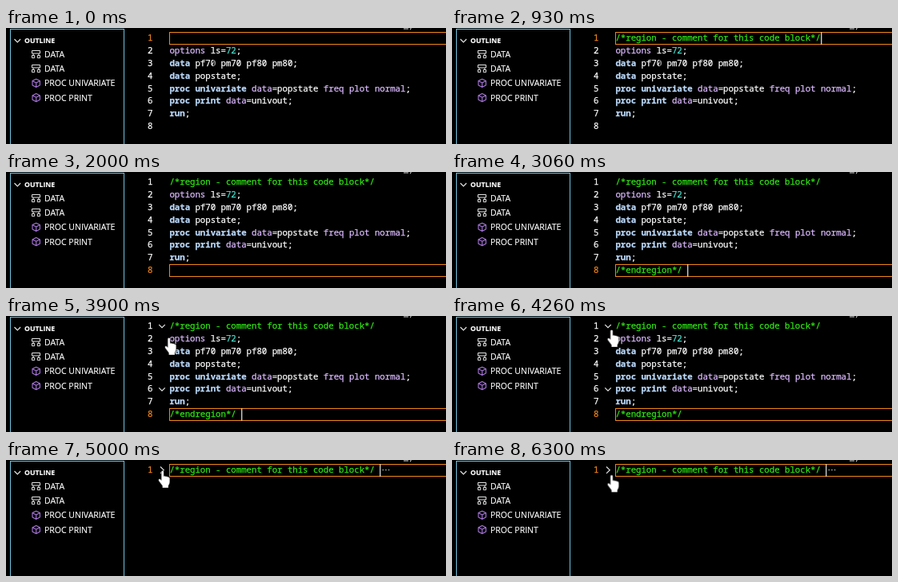
Animation, 550 px wide and 146 px high, one loop 6430 ms. Source, as an HTML page:

```html
<!DOCTYPE html>
<html lang="en">
<head>
<meta charset="utf-8">
<title>Folding a region</title>
<style>
html, body { margin: 0; width: 100%; height: 100%; overflow: hidden; background: #000; }
svg { display: block; width: 550px; height: 146px; }
text { white-space: pre; color: #fff; }
text, tspan { fill: currentColor; stroke: currentColor; stroke-width: .15px; }
.code text { font: 500 10.7px "Noto Sans Mono", "DejaVu Sans Mono", monospace; }
.code text, .code tspan { stroke-width: .25px; }
.tree text { font: 10.5px "Open Sans", "Noto Sans", sans-serif; }
.tree .title { font-size: 8.7px; font-weight: 700; }
.step { font-weight: 600; color: #bcdafc; }
.opt { color: #dcbaff; }
.num { color: #45dccb; }
.line { fill: none; stroke: #e4e4e4; }
.edge { fill: none; stroke: #6fc3df; }
.cube { fill: none; stroke: #a877dc; stroke-width: 1.1; stroke-linejoin: round; }

/* one shared clock for every part */
.t { animation: 6430ms step-end infinite; }
#box { animation-name: box; }
#caret { animation-name: caret; }
#n1 { animation-name: n1; }
#n8 { animation-name: n8; }
#open { animation-name: open; }
#close { animation-name: close; }
#body { animation-name: body; }
#folds { animation-name: folds; }
#folded { animation-name: folded; }
#beam { animation: beam 6430ms linear infinite; }
#hand { animation: hand 6430ms linear infinite, show-hand 6430ms step-end infinite; }

@keyframes box {
  0%, 77.75% { transform: none; }
  25.97% { transform: translateY(111px); }
}
@keyframes caret {
  0% { transform: translate(211px, 5px); opacity: 0; }
  3.11% { transform: translate(211px, 5px); opacity: 1; }
  7.77% { transform: translate(211px, 5px); opacity: 0; }
  11.81% { transform: translate(461px, 5px); opacity: 1; }
  17.1% { transform: translate(461px, 5px); opacity: 0; }
  21.77% { transform: translate(461px, 5px); opacity: 1; }
  25.97% { transform: translate(204.6px, 116px); opacity: 1; }
  31.1% { transform: translate(204.6px, 116px); opacity: 0; }
  35.76% { transform: translate(204.6px, 116px); opacity: 1; }
  37.32% { transform: translate(294px, 116px); opacity: 1; }
  42.45% { transform: translate(294px, 116px); opacity: 0; }
  47.58% { transform: translate(294px, 116px); opacity: 1; }
  52.87% { transform: translate(294px, 116px); opacity: 0; }
  58% { transform: translate(294px, 116px); opacity: 1; }
  63.14% { transform: translate(294px, 116px); opacity: 0; }
  67.8% { transform: translate(294px, 116px); opacity: 1; }
  72.47% { transform: translate(294px, 116px); opacity: 0; }
  77.75% { transform: translate(467px, 5px); opacity: 1; }
  82.89% { transform: translate(467px, 5px); opacity: 0; }
  88.02% { transform: translate(467px, 5px); opacity: 1; }
  92.69% { transform: translate(467px, 5px); opacity: 0; }
  97.97%, 100% { transform: translate(467px, 5px); opacity: 1; }
}
@keyframes n1 { 0%, 77.75%, 100% { color: #f38518; } 25.97% { color: #fff; } }
@keyframes n8 { 0%, 77.75%, 100% { color: #fff; } 25.97% { color: #f38518; } }
@keyframes open {
  0% { opacity: 0; color: #7ca668; }
  11.81% { opacity: 1; color: #7ca668; }
  14.46%, 100% { opacity: 1; color: #2fe812; }
}
@keyframes close {
  0% { opacity: 0; color: #7ca668; }
  37.32% { opacity: 1; color: #7ca668; }
  40.43%, 100% { opacity: 1; color: #2fe812; }
}
@keyframes body { 0% { opacity: 1; } 77.75%, 100% { opacity: 0; } }
@keyframes folds { 0%, 77.75%, 100% { opacity: 0; } 60.65% { opacity: 1; } }
@keyframes folded { 0% { opacity: 0; } 77.75%, 100% { opacity: 1; } }
@keyframes beam {
  0%, 21.77% { transform: translate(260px, 44px); opacity: 1; }
  25.97% { transform: translate(280px, 121px); }
  31.1%, 52.87% { transform: translate(291px, 124px); }
  60.64% { transform: translate(207px, 32px); opacity: 1; }
  60.65%, 100% { transform: translate(207px, 32px); opacity: 0; }
}
@keyframes hand {
  0%, 60.65% { transform: translate(198px, 27px); }
  62.67% { transform: translate(193px, 19px); }
  66.25% { transform: translate(193.8px, 17px); }
  67.8%, 72% { transform: translate(193.8px, 17.5px); }
  72.005%, 81.33% { transform: translate(190px, 13px); }
  83.98%, 100% { transform: translate(193.8px, 18.5px); }
}
@keyframes show-hand { 0% { opacity: 0; } 60.65%, 100% { opacity: 1; } }
</style>
</head>
<body>
<svg viewBox="0 0 550 146" xmlns="http://www.w3.org/2000/svg">
  <defs>
    <path id="struct" class="line" d="M.5.5h10v3.5h-10zM.5 6.5h3.2v3.2h-3.2zM7.3 6.5h3.2v3.2h-3.2zM2.1 4v2.5M8.9 4v2.5"/>
    <path id="cube" class="cube" d="M5.5.3l4.7 2.3v5.4l-4.7 2.5-4.7-2.5v-5.4zM.8 2.6l4.7 2.3 4.7-2.3M5.5 4.9v5.6"/>
    <path id="down" class="line" d="M0 0l3.8 3.8L7.6 0" stroke-width="1.2"/>
  </defs>

  <g class="tree">
    <path class="edge" d="M5.5 1V146M147.5 1V146M5 1.5H148"/>
    <use href="#down" x="10.5" y="14"/>
    <text class="title" x="23" y="19">OUTLINE</text>
    <use href="#struct" x="32" y="28"/>
    <text x="48" y="36.8">DATA</text>
    <use href="#struct" x="32" y="46"/>
    <text x="48" y="55">DATA</text>
    <use href="#cube" x="32.2" y="64"/>
    <text x="48" y="73.2">PROC UNIVARIATE</text>
    <use href="#cube" x="32.2" y="82.3"/>
    <text x="48" y="91.5">PROC PRINT</text>
  </g>

  <path class="line" d="M497 1h6M506.3 0l-1 2.2"/>

  <g class="code">
    <text id="n1" class="t" x="177" y="16">1</text>
    <text id="open" class="t" x="204.4" y="16">/*region - comment for this code block*/</text>
    <g id="body" class="t">
      <text x="177" y="32">2</text>
      <text x="204.4" y="32"><tspan class="opt">options</tspan> ls=<tspan class="num">72</tspan>;</text>
      <text x="177" y="48">3</text>
      <text x="204.4" y="48"><tspan class="step">data</tspan> pf70 pm70 pf80 pm80;</text>
      <text x="177" y="64">4</text>
      <text x="204.4" y="64"><tspan class="step">data</tspan> popstate;</text>
      <text x="177" y="79.5">5</text>
      <text x="204.4" y="79.5"><tspan class="step">proc univariate</tspan> <tspan class="opt">data</tspan>=popstate <tspan class="opt">freq plot normal</tspan>;</text>
      <text x="177" y="95.3">6</text>
      <text x="204.4" y="95.3"><tspan class="step">proc print</tspan> <tspan class="opt">data</tspan>=univout;</text>
      <text x="177" y="111">7</text>
      <text x="204.4" y="111"><tspan class="step">run</tspan>;</text>
      <text id="n8" class="t" x="177" y="127">8</text>
      <text id="close" class="t" x="204.4" y="127">/*endregion*/</text>
    </g>
  </g>

  <rect id="box" class="t" x="204.5" y="5.5" width="360" height="15" fill="none" stroke="#f38518"/>
  <rect id="caret" class="t" x="0.2" y="0.3" width="1.1" height="15.4" fill="#fff"/>

  <g id="folds" class="t">
    <use href="#down" x="191.2" y="10.8"/>
    <use href="#down" x="191.2" y="90.3"/>
  </g>
  <g id="folded" class="t">
    <path class="line" d="M193 8.5l4.2 4.2L193 16.9" stroke-width="1.2"/>
    <path d="M470.5 12.5h1.6m2 0h1.6m2 0h1.6" stroke="#9a9a9a" stroke-width="1.4"/>
  </g>

  <path id="beam" d="M-2-6h4M0-6V6M-2 6h4" fill="none" stroke="#000"/>
  <g id="hand">
    <path transform="scale(1.07)" fill="#fff" stroke="#000" paint-order="stroke"
      d="M4 12V1.8q0-1.3 1.3-1.3t1.3 1.3V7q1.2-.9 2.4.3 1.2-.7 2.3.5 2.2-.5 2.3 1.7v4.5q0 2-1.6 4V20.5H5.2V18L1 12.6q-1-1.8.4-2.4 1-.3 2.6 1.8z"/>
  </g>
</svg>
</body>
</html>
```
